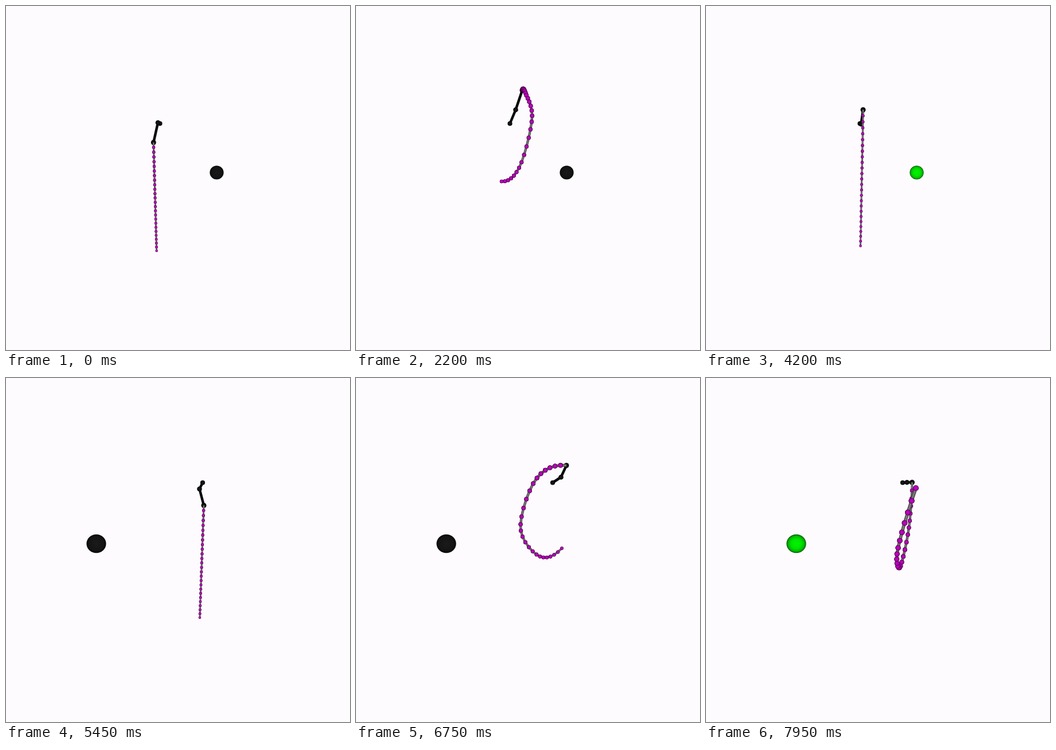
Recreate the animation shown at these times as an HTML page with a canvas. Size 600x600 px, loop 8000 ms.

```html
<!DOCTYPE html>
<html lang="en">
<head>
<meta charset="utf-8">
<title>Whip and target</title>
<style>
  html, body { margin: 0; width: 100%; height: 100%; overflow: hidden; background: #fdfbfe; }
  canvas { display: block; width: 100vw; height: 100vh; }
</style>
</head>
<body>
<canvas id="stage" width="600" height="600"></canvas>
<script>
const ctx = document.getElementById("stage").getContext("2d");
const LOOP = 8000, STEP = 50, BEADS = 25, QUARTERS = 4;
const HANGING = [2.7, 2.3], REACHING = [3.4, 5];

const P = (x, y) => ({ x, y });
const mix = (a, b, u) => a + (b - a) * u;

// Whip from hand to tip; beads shrink together towards the tip, sag bends it down
function arc(hand, tip, sag = 0) {
  return Array.from({ length: QUARTERS + 1 }, (_, k) => {
    const s = k / QUARTERS, along = s * (1.13 - 0.13 * s);
    return P(mix(hand.x, tip.x, along), mix(hand.y, tip.y, along) + 4 * sag * s * (1 - s));
  });
}

// A pose: whip knots at the quarters of its length, bead radius at hand and tip
const pose = (t, elbow, whip, size = HANGING) => ({ t, elbow, whip, size });

const ballA = P(367.5, 290.5), ballB = P(157.5, 289);

const first = {
  shoulder: P(268.5, 205), ball: ballA, rx: 12.1, ry: 12.1, hit: 2950,
  poses: [
    pose(0, P(265, 203.5), arc(P(257.3, 238), P(262.7, 427))),
    pose(900, P(263, 212), arc(P(257, 249), P(252, 439))),
    pose(1400, P(271.5, 236), [P(273.8, 252), P(270.8, 311), P(264, 350), P(258.7, 374), P(258.5, 395.5)], [3.4, 2.1]),
    pose(1700, P(276, 206), arc(P(281, 184), P(254, 357)), [3.6, 2.5]),
    pose(2200, P(278.5, 181), [P(290, 147), P(296, 152.5), P(307, 196.5), P(285.5, 280), P(254, 306)], [4.1, 3.3]),
    pose(2950, P(271, 205), arc(P(276, 180), ballA, 55), REACHING),
    pose(3250, P(270.5, 207), [P(273, 193.5), P(269.8, 265), P(272.5, 327.5), P(304.5, 325), P(348, 256)], [3, 4.4]),
    pose(3950, P(270.5, 206), arc(P(274, 181), P(268, 423))),
    pose(4450, P(270.5, 206), arc(P(274, 181), P(271, 414)))
  ]
};

const second = {
  shoulder: P(343, 182.5), ball: ballB, rx: 17.1, ry: 16.2, hit: 7250, start: 4500,
  poses: [
    pose(4500, P(338, 191), arc(P(344, 219), P(338, 413))),
    pose(5450, P(337.5, 193.5), arc(P(345, 222.3), P(338, 418))),
    pose(5900, P(338, 198), arc(P(347, 232), P(336, 431))),
    pose(6350, P(354, 190), arc(P(360, 174), P(347, 368)), [3.6, 2.8]),
    pose(6750, P(357.5, 173), [P(367, 152.5), P(314, 176.5), P(287, 261), P(319.5, 310.7), P(359, 297)], [4.3, 3]),
    pose(7250, P(352, 180), arc(P(362, 175), ballB, 95), REACHING),
    pose(7650, P(350.5, 182), arc(P(360, 181), P(352, 124), 185), REACHING),
    pose(7950, P(350.5, 182), [P(359.5, 182), P(353.5, 264), P(338.5, 330), P(334.5, 299), P(366, 192)], [3.1, 5.1])
  ]
};

// Flatten poses so that every quantity moves by the same rule
for (const scene of [first, second]) {
  scene.keys = scene.poses.map(({ t, elbow, whip, size }) =>
    ({ t, v: [...[elbow, ...whip].flatMap(p => [p.x, p.y]), ...size] }));
}

// Monotone tangent: flat at turning points, harmonic mean elsewhere
function slope(keys, k, c) {
  const rate = i => (keys[i + 1].v[c] - keys[i].v[c]) / (keys[i + 1].t - keys[i].t);
  if (k === 0 || k === keys.length - 1) return 0;
  const a = rate(k - 1), b = rate(k);
  return a * b > 0 ? 2 * a * b / (a + b) : 0;
}

function hermite(a, b, ma, mb, u) {
  const u2 = u * u, u3 = u2 * u;
  return a * (2 * u3 - 3 * u2 + 1) + b * (3 * u2 - 2 * u3) + ma * (u3 - 2 * u2 + u) + mb * (u3 - u2);
}

function valuesAt(keys, t) {
  const next = keys.findIndex(q => q.t > t);
  if (next < 0) return keys[keys.length - 1].v;
  const k = Math.max(next - 1, 0), a = keys[k], b = keys[k + 1], h = b.t - a.t;
  return a.v.map((p, c) =>
    hermite(p, b.v[c], h * slope(keys, k, c), h * slope(keys, k + 1, c), (t - a.t) / h));
}

// Smooth curve through the knots, ends extrapolated
function along(knots, s, axis) {
  const n = knots.length - 1, k = Math.min(Math.floor(s * n), n - 1);
  const at = i =>
    i < 0 ? 3 * at(0) - 3 * at(1) + at(2) :
    i > n ? 3 * at(n) - 3 * at(n - 1) + at(n - 2) : knots[i][axis];
  return hermite(at(k), at(k + 1), (at(k + 1) - at(k - 1)) / 2, (at(k + 2) - at(k)) / 2, s * n - k);
}

function sphere(p, rx, ry, stops) {
  ctx.save();
  ctx.translate(p.x, p.y);
  ctx.scale(rx, ry);
  const g = ctx.createRadialGradient(0, 0, 0, 0, 0, 1);
  stops.forEach(([at, color]) => g.addColorStop(at, color));
  ctx.fillStyle = g;
  ctx.beginPath();
  ctx.arc(0, 0, 1, 0, Math.PI * 2);
  ctx.fill();
  ctx.restore();
}

function rod(a, b, width, color) {
  ctx.strokeStyle = color;
  ctx.lineWidth = width;
  ctx.beginPath();
  ctx.moveTo(a.x, a.y);
  ctx.lineTo(b.x, b.y);
  ctx.stroke();
}

const GREEN = [[0, "#00f400"], [0.5, "#00e600"], [0.8, "#00bd00"], [0.94, "#007d00"], [1, "#003c00"]];
const BLACK = [[0, "#1a1a1b"], [0.75, "#141415"], [1, "#080808"]];
const JOINT = [[0, "#19191a"], [0.6, "#101011"], [1, "#050505"]];
const PURPLE = [[0, "#c800c8"], [0.5, "#b800b8"], [0.8, "#8c008c"], [1, "#400040"]];

function drawArm(shoulder, elbow, hand) {
  rod(shoulder, elbow, 4.5, "#08080a");
  rod(elbow, hand, 4.5, "#08080a");
  [shoulder, elbow, hand].forEach((p, i) => sphere(p, 4.1 + i * 0.2, 4.1 + i * 0.2, JOINT));
}

function drawWhip(knots, baseR, tipR) {
  let prev = knots[0];
  for (let i = 1; i <= BEADS; i++) {
    const s = i / BEADS, r = mix(baseR, tipR, s);
    const bead = P(along(knots, s, "x"), along(knots, s, "y"));
    rod(prev, bead, r * 1.15, "#3c3c3c");
    rod(prev, bead, r * 0.7, "#777");
    if (i > 1) sphere(prev, r, r, PURPLE);
    sphere(bead, r, r, PURPLE);
    prev = bead;
  }
}

function draw(t) {
  const scene = t < second.start ? first : second;
  const v = valuesAt(scene.keys, t);
  const [baseR, tipR] = v.splice(-2);
  const points = [];
  for (let i = 0; i < v.length; i += 2) points.push(P(v[i], v[i + 1]));
  const [elbow, ...knots] = points;

  ctx.fillStyle = "#fdfbfe";
  ctx.fillRect(0, 0, 600, 600);
  sphere(scene.ball, scene.rx, scene.ry, t >= scene.hit ? GREEN : BLACK);
  drawArm(scene.shoulder, elbow, knots[0]);
  drawWhip(knots, baseR, tipR);
}

function frame() {
  const t = performance.now() % LOOP;
  draw(Math.floor(t / STEP) * STEP);
  requestAnimationFrame(frame);
}
frame();
</script>
</body>
</html>
```
